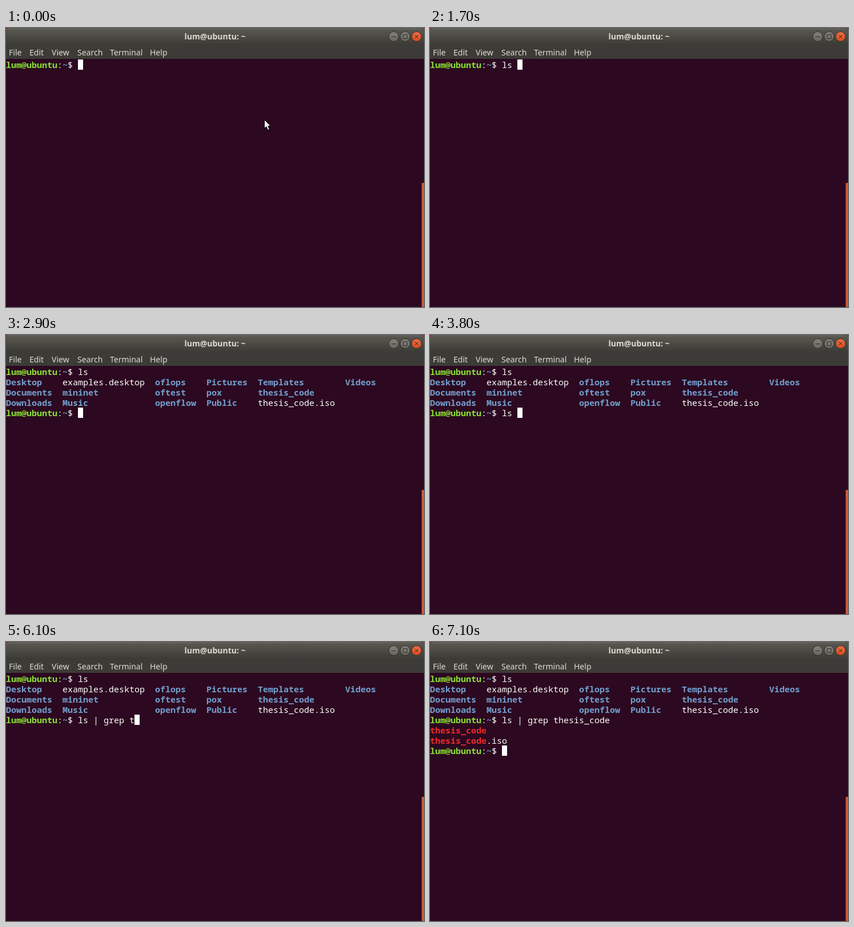
An HTML page for the animation above (8000 ms loop, 732 by 488 pixels).

```html
<!DOCTYPE html>
<html lang="en">
<head>
<meta charset="utf-8">
<title>Terminal</title>
<style>
  html, body { margin: 0; width: 100%; height: 100%; overflow: hidden; background: #2c0920; }
  svg { display: block; }
  .ui { font: 14px "Noto Sans", "Open Sans", sans-serif; fill: #dfdbd2; }
  .title { font-weight: 700; text-anchor: middle; }
  .mono { font: 15px "Noto Sans Mono", "Liberation Mono", monospace; fill: #fff; }
  .user, .dir, .match { font-weight: 700; }
  .user { fill: #8ae234; }
  .dir { fill: #729fcf; }
  .match { fill: #ef2929; }
</style>
</head>
<body>
<svg width="732" height="488" viewBox="0 0 732 488">
  <defs>
    <linearGradient id="bar" x2="0" y2="1">
      <stop offset="0" stop-color="#5b5a52"/>
      <stop offset="1" stop-color="#3d3c37"/>
    </linearGradient>
    <linearGradient id="grey" x2="0" y2="1">
      <stop offset="0" stop-color="#838179"/>
      <stop offset="1" stop-color="#68665e"/>
    </linearGradient>
    <linearGradient id="orange" x2="0" y2="1">
      <stop offset="0" stop-color="#ee6e46"/>
      <stop offset="1" stop-color="#d94a1b"/>
    </linearGradient>
  </defs>

  <rect width="732" height="54" fill="#8f3f3f"/>
  <path d="M0 54V6Q0 0 6 0H726Q732 0 732 6V54Z" fill="#3c3b37"/>
  <path d="M0 28V6Q0 0 6 0H726Q732 0 732 6V28Z" fill="url(#bar)"/>
  <path d="M5 1.5H727" stroke="#69675e"/>
  <text class="ui title" x="366" y="20">lum@ubuntu: ~</text>
  <text class="ui" y="48">
    <tspan x="5">File</tspan><tspan x="41">Edit</tspan><tspan x="80">View</tspan>
    <tspan x="125">Search</tspan><tspan x="182">Terminal</tspan><tspan x="252">Help</tspan>
  </text>

  <g stroke="#32312d">
    <circle cx="679" cy="15" r="8.5" fill="url(#grey)"/>
    <circle cx="699" cy="15" r="8.5" fill="url(#grey)"/>
    <circle cx="719" cy="15" r="8.5" fill="url(#orange)"/>
    <path d="M675 15.5H683M695.5 11.5H702.5V18.5H695.5ZM716 12L722 18M722 12L716 18" fill="none"/>
  </g>

  <rect y="54" width="732" height="434" fill="#2c0920"/>
  <rect x="728" y="271" width="4" height="217" fill="#cb5c3c"/>

  <g id="screen" class="mono"></g>
  <rect id="caret" width="9" height="18" fill="#fff"/>

  <path id="arrow" d="M452.5 160.5V175.5L456 172.5L458.5 178.5L461.3 177.3L458.8 171.5H463.3Z"
        fill="#fff" stroke="#000"/>
  <g id="beam" fill="none">
    <path d="M451 155.5H458M451 169.5H458M454.5 155V170" stroke="#fff" stroke-width="3"/>
    <path d="M452 155.5H457M452 169.5H457M454.5 155V170" stroke="#000"/>
  </g>
</svg>
<script>
const CELL_W = 9, CELL_H = 18, FIRST_BASELINE = 70, CELL_ASCENT = 15;
const LOOP = 8000, TICK = 100;
const BLINK = 600, BLINK_START = 1700, TYPING_HOLD = 500;
const FIRST_KEY = 800, LISTED = 2100, COMPLETED = 6600, FOUND = 7100;
const ARROW_END = 100, BEAM_END = 500;

// Typing rhythm: [ms, characters typed], evenly spaced in between
const COMMANDS = [
  { text: "ls", keys: [[FIRST_KEY, 1], [1100, 3]] },
  { text: "ls | grep thesis_code",
    keys: [[3600, 1], [3800, 3], [4400, 4], [4700, 6], [5000, 8], [5600, 10], [6100, 11], [6400, 14]] },
  { text: "", keys: [] }
];
const FILES = ("Desktop Documents Downloads examples.desktop mininet Music oflops oftest openflow " +
  "Pictures pox Public Templates thesis_code thesis_code.iso Videos").split(" ");
const LIST_ROWS = 3;

const byId = id => document.getElementById(id);
const show = (id, on) => byId(id).style.display = on ? "" : "none";

function put(row, col, text, cls = "") {
  const node = document.createElementNS("http://www.w3.org/2000/svg", "text");
  node.setAttribute("x", col * CELL_W);
  node.setAttribute("y", FIRST_BASELINE + row * CELL_H);
  node.setAttribute("class", cls);
  node.textContent = text;
  byId("screen").append(node);
  return col + text.length;
}

// Writes prompt and command, and returns the column after the prompt
function putPrompt(row, command) {
  let col = put(row, 0, "lum@ubuntu", "user");
  col = put(row, col, ":");
  col = put(row, col, "~", "dir");
  col = put(row, col, "$ ");
  put(row, col, command);
  return col;
}

// Fills columns downwards, each as wide as its longest name plus two
function putListing(row) {
  let col = 0;
  for (let i = 0; i < FILES.length; i += LIST_ROWS) {
    const names = FILES.slice(i, i + LIST_ROWS);
    names.forEach((name, j) => put(row + j, col, name, name.includes(".") ? "" : "dir"));
    col += Math.max(...names.map(name => name.length)) + 2;
  }
  return row + LIST_ROWS;
}

function putMatches(row) {
  const pattern = "thesis_code";
  for (const name of FILES.filter(file => file.includes(pattern))) {
    const col = put(row, 0, pattern, "match");
    put(row++, col, name.slice(pattern.length));
  }
  return row;
}

function typedCount({ text, keys }, t) {
  if (t >= COMPLETED) return text.length;
  const i = keys.findLastIndex(([time]) => time <= t);
  if (i < 0) return 0;
  const [t0, n0] = keys[i], [t1, n1] = keys[i + 1] ?? [LOOP, n0];
  return Math.floor(n0 + (n1 - n0) * (t - t0) / (t1 - t0));
}

// Steady while typing and outside the session, otherwise blinking
function caretVisible(command, t) {
  if (t < FIRST_KEY || t >= FOUND) return true;
  if (typedCount(command, t) !== typedCount(command, t - TYPING_HOLD)) return true;
  return Math.floor((t - BLINK_START) / BLINK) % 2 === 0;
}

function draw(t) {
  byId("screen").replaceChildren();
  let row = 0, active = 0;
  if (t >= LISTED) {
    putPrompt(row, COMMANDS[active++].text);
    row = putListing(row + 1);
  }
  if (t >= FOUND) {
    putPrompt(row, COMMANDS[active++].text);
    row = putMatches(row + 1);
  }
  const command = COMMANDS[active], count = typedCount(command, t);
  const col = putPrompt(row, command.text.slice(0, count)) + count;

  byId("caret").setAttribute("x", col * CELL_W);
  byId("caret").setAttribute("y", FIRST_BASELINE - CELL_ASCENT + row * CELL_H);
  show("caret", caretVisible(command, t));
  show("arrow", t < ARROW_END);
  show("beam", t >= ARROW_END && t < BEAM_END);
}

let shown;
function tick() {
  const t = Math.floor(performance.now() % LOOP / TICK) * TICK;
  if (t !== shown) draw(shown = t);
  requestAnimationFrame(tick);
}
tick();
</script>
</body>
</html>
```
